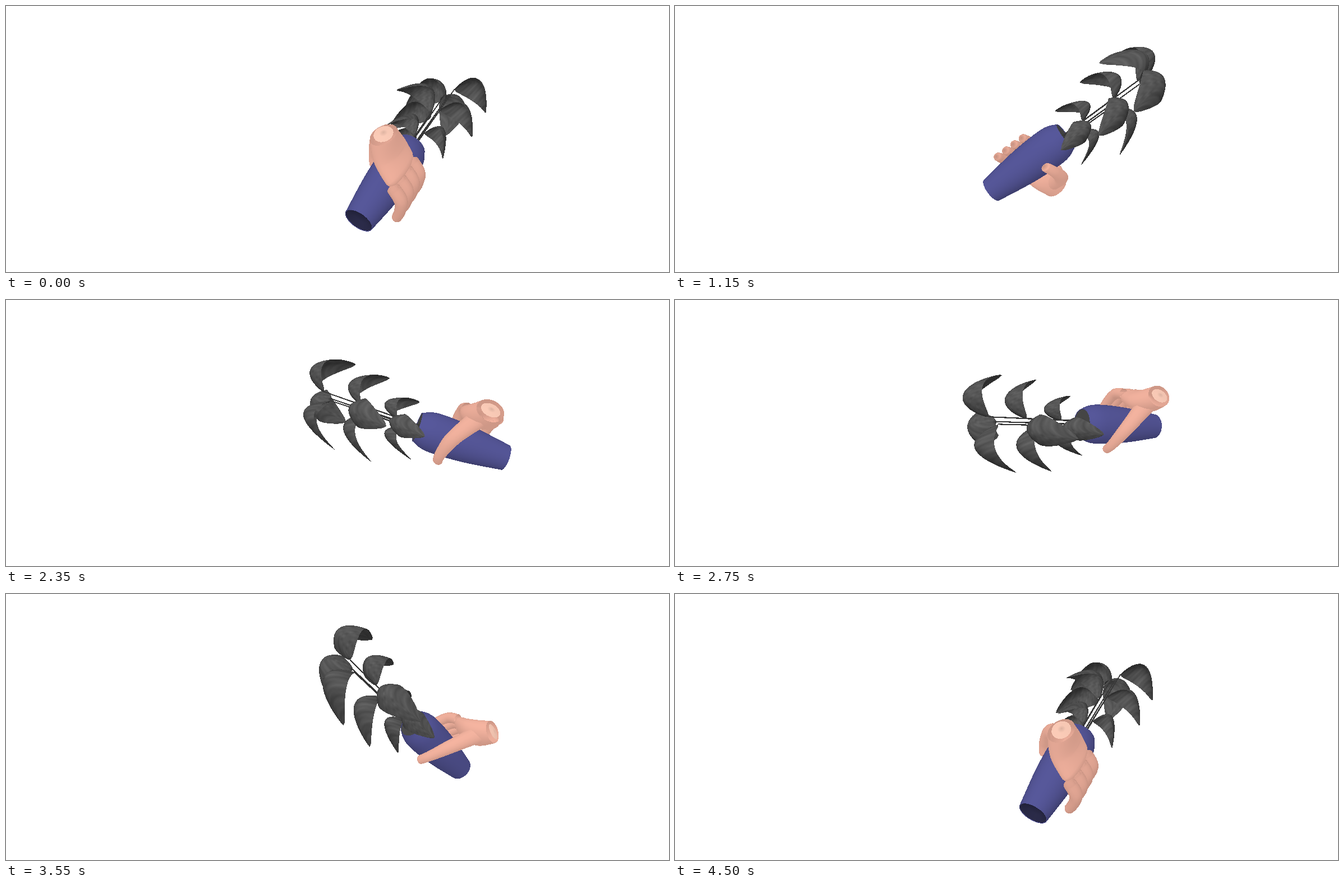
These frames come from a looping animation (1182x474 px, 4.55 s). An HTML page with a canvas:

```html
<!DOCTYPE html>
<html lang="en">
<head>
<meta charset="utf-8">
<title>Hand holding a potted plant</title>
<style>
html, body { margin: 0; width: 100%; height: 100%; overflow: hidden; background: #fff; }
canvas { display: block; }
</style>
</head>
<body>
<canvas id="stage" width="1182" height="474"></canvas>
<script>
const W = 1182, H = 474, LOOP = 4550, STEP = 50;
const CX = 715, CY = 234, CAMERA = 800;
const PIVOT = [0, 16, 16];
const ctx = document.getElementById('stage').getContext('2d');
const image = ctx.createImageData(W, H);
const pixels = new Uint32Array(image.data.buffer);
const depth = new Float32Array(W * H);

const { sin, cos, sqrt, PI, min, max, floor, ceil, abs } = Math;
const RAD = PI / 180;
const dot = (a, b) => a[0] * b[0] + a[1] * b[1] + a[2] * b[2];
const sub = (a, b) => a.map((x, i) => x - b[i]);
const cross = (a, b) => [a[1] * b[2] - a[2] * b[1], a[2] * b[0] - a[0] * b[2], a[0] * b[1] - a[1] * b[0]];
const unit = a => { const l = sqrt(dot(a, a)) || 1; return a.map(x => x / l); };
const clamp = x => min(1, max(0, x));

// Model: y runs up the vase axis (0 at the rim), x towards the wrist, z to the thumb side.
const verts = [], tris = [];

function grid(rows, cols, f, rgb, ambient, tone = () => 1) {
  const first = verts.length, e = 0.004;
  for (let i = 0; i <= rows; i++) for (let j = 0; j <= cols; j++) {
    const s = i / rows, t = j / cols;
    const ds = sub(f(clamp(s + e), t), f(clamp(s - e), t));
    const dt = sub(f(s, clamp(t + e)), f(s, clamp(t - e)));
    verts.push({ p: sub(f(s, t), PIVOT), n: unit(cross(ds, dt)), ambient, tone: tone(s, t) });
    if (i && j) {
      const d = first + i * (cols + 1) + j, b = d - cols - 1;
      tris.push([b - 1, b, d, rgb], [b - 1, d, d - 1, rgb]);
    }
  }
}

// Smooth curve through points of any dimension
function along(pts, s) {
  const x = clamp(s) * (pts.length - 1), k = min(floor(x), pts.length - 2), u = x - k;
  const b = pts[k], c = pts[k + 1], a = pts[k - 1] || b, d = pts[k + 2] || c;
  return b.map((v, i) => v + 0.5 * u * (c[i] - a[i] +
    u * (2 * a[i] - 5 * v + 4 * c[i] - d[i] + u * (3 * (v - c[i]) + d[i] - a[i]))));
}

// Points are x, y, z, radius
const lathe = pts => (s, t) => {
  const [x, y, z, r] = along(pts, s), a = t * 2 * PI;
  return [x + r * cos(a), y, z + r * sin(a)];
};

// Points are x, y, z, radius along y, radius across; the far end is rounded off
const tube = (pts, round) => (s, t) => {
  const [x, y, z, ry, rn] = along(pts, s), a = t * 2 * PI;
  const d = sub(along(pts, s + 0.01), along(pts, s - 0.01));
  const n = unit([-d[2], 0, d[0]]);
  const k = s > 1 - round ? sqrt(max(0, 1 - ((s - 1 + round) / round) ** 2)) : 1;
  return [x + n[0] * rn * k * cos(a), y + ry * k * sin(a), z + n[2] * rn * k * cos(a)];
};

const BLUE = [88, 89, 156], SKIN = [246, 181, 161], CUT = [252, 204, 184];
const SOIL = [76, 76, 76], HOLLOW = [46, 46, 78], LEAF = [102, 102, 102], STEM = [64, 64, 64];

function vase() {
  grid(20, 36, lathe([[0, 0, 0, 27], [0, -28, 0, 36], [0, -95, 0, 34], [0, -173, 0, 24]]), BLUE, 0.72);
  grid(2, 30, lathe([[0, -3, 0, 0], [0, -1, 0, 26]]), SOIL, 0.8);
  grid(2, 30, lathe([[0, -160, 0, 0], [0, -172.5, 0, 23]]), HOLLOW, 0.75);
}

function hand() {
  const wrist = [114, -92, 2, 24, 19];
  grid(16, 24, tube([wrist, [78, -89, -8, 35, 20], [50, -97, -36, 37, 14]], 0.2), SKIN, 0.84);
  grid(3, 20, tube([[119, -92, 2, 0, 0], wrist], 0.001), CUT, 0.88);
  grid(24, 16, tube([[86, -82, 6, 20, 16], [50, -56, 34, 14, 12], [8, -50, 45, 10, 9], [-20, -54, 43, 9, 8]], 0.08), SKIN, 0.84);
  for (let y = -70; y >= -130; y -= 20)
    grid(20, 14, tube([[54, y, -36, 10, 10], [32, y, -49, 11, 10], [4, y, -48, 10, 9], [-23, y, -41, 8, 8]], 0.12), SKIN, 0.8);
}

// Three tiers of three arched leaves, each on its own stem
function plant() {
  [-95, 127, 45, -90, 120, 45, -87, 119, 190].forEach((heading, i) => {
    const tier = floor(i / 3), c = cos(heading * RAD), d = sin(heading * RAD);
    const base = 25 + 68 * tier + (heading < 0 ? 16 : 0);
    const reach = 54 + 26 * min(tier, 1), half = 20 + 5 * tier;
    const rise = 28 + 5 * tier, fall = 35;
    const up = 2 * rise + 2 * sqrt(rise * (rise + fall)), down = up + fall;
    const leaf = (s, t) => {
      const side = 2 * t - 1, wide = max(0, sin(PI * s)) ** 0.75;
      const r = 6 + reach * s, q = half * wide * side;
      return [c * r - d * q, base + up * s - down * s * s - 22 * wide * side * side, d * r + c * q];
    };
    const streak = (s, t) => 0.9 + 0.12 * sin(43 * s + 9 * abs(2 * t - 1) + i) * sin(19 * s - 5 * t + 2 * i);
    grid(26, 12, leaf, LEAF, 0.5, streak);
    grid(6, 5, lathe([[c * 5, -4, d * 5, 1.4], [c * 6, base, d * 6, 1]]), STEM, 0.7);
  });
}

vase();
hand();
plant();

// Poses: time, then degrees: heading of the vase on screen, lean to the viewer, roll about its axis
const poses = [
  [0, 54, -38, 112],
  [700, 7, -3, 237],
  [1650, 87, 15, 375],
  [2350, 161, 6, 416],
  [3150, 175, 53, 420],
  [4000, 84, 6, 385],
  [4500, 58, -37, 464]
];

function angles(time) {
  const n = poses.length;
  const at = k => {
    const turn = floor(k / n), [t, heading, lean, roll] = poses[(k + n) % n];
    return [t + LOOP * turn, heading, lean, roll + 360 * turn];
  };
  let k = n - 1;
  while (poses[k][0] > time) k--;
  const [a, b, c, d] = [-1, 0, 1, 2].map(i => at(k + i));
  const span = c[0] - b[0], u = (time - b[0]) / span;
  return [1, 2, 3].map(i => {
    const p = b[i], q = c[i];
    const m = (q - a[i]) / (c[0] - a[0]) * span, o = (d[i] - p) / (d[0] - b[0]) * span;
    return RAD * (p + u * (m + u * (3 * (q - p) - 2 * m - o + u * (2 * (p - q) + m + o))));
  });
}

function axes(time) {
  const [heading, lean, roll] = angles(time);
  const y = [cos(lean) * cos(heading), cos(lean) * sin(heading), sin(lean)];
  const flat = [sin(heading), -cos(heading), 0], front = cross(flat, y);
  const x = flat.map((v, i) => v * cos(roll) + front[i] * sin(roll));
  return [x, y, cross(x, y)];
}

const LIGHT = unit([-0.15, 0.4, 0.9]);

function project(v, m) {
  const turn = p => [0, 1, 2].map(i => p[0] * m[0][i] + p[1] * m[1][i] + p[2] * m[2][i]);
  const p = turn(v.p), n = turn(v.n);
  const scale = CAMERA / (CAMERA - p[2]);
  const facing = dot(n, [-p[0], -p[1], CAMERA - p[2]]) < 0 ? -1 : 1;
  const lit = max(0, dot(n, LIGHT) * facing);
  return [CX + p[0] * scale, CY - p[1] * scale, scale, (v.ambient + (1 - v.ambient) * lit) * v.tone];
}

function fill(a, b, c, rgb) {
  const area = (b[0] - a[0]) * (c[1] - a[1]) - (b[1] - a[1]) * (c[0] - a[0]);
  if (!area) return;
  const x0 = max(0, ceil(min(a[0], b[0], c[0]) - 0.5)), x1 = min(W - 1, floor(max(a[0], b[0], c[0]) - 0.5));
  const y0 = max(0, ceil(min(a[1], b[1], c[1]) - 0.5)), y1 = min(H - 1, floor(max(a[1], b[1], c[1]) - 0.5));
  for (let y = y0; y <= y1; y++) for (let x = x0; x <= x1; x++) {
    const px = x + 0.5, py = y + 0.5;
    const u = ((b[0] - px) * (c[1] - py) - (b[1] - py) * (c[0] - px)) / area;
    const v = ((c[0] - px) * (a[1] - py) - (c[1] - py) * (a[0] - px)) / area;
    const w = 1 - u - v;
    if (u < 0 || v < 0 || w < 0) continue;
    const z = u * a[2] + v * b[2] + w * c[2], i = y * W + x;
    if (z <= depth[i]) continue;
    depth[i] = z;
    const l = u * a[3] + v * b[3] + w * c[3];
    pixels[i] = 0xff000000 | min(255, rgb[2] * l) << 16 | min(255, rgb[1] * l) << 8 | min(255, rgb[0] * l);
  }
}

function draw(time) {
  pixels.fill(0xffffffff);
  depth.fill(0);
  const m = axes(time), pts = verts.map(v => project(v, m));
  for (const [a, b, c, rgb] of tris) fill(pts[a], pts[b], pts[c], rgb);
  ctx.putImageData(image, 0, 0);
}

let start, shown = 0;
function tick(now) {
  start ??= now;
  const time = floor((now - start) % LOOP / STEP) * STEP;
  if (time != shown) draw(shown = time);
  requestAnimationFrame(tick);
}
draw(0);
requestAnimationFrame(tick);
</script>
</body>
</html>
```
